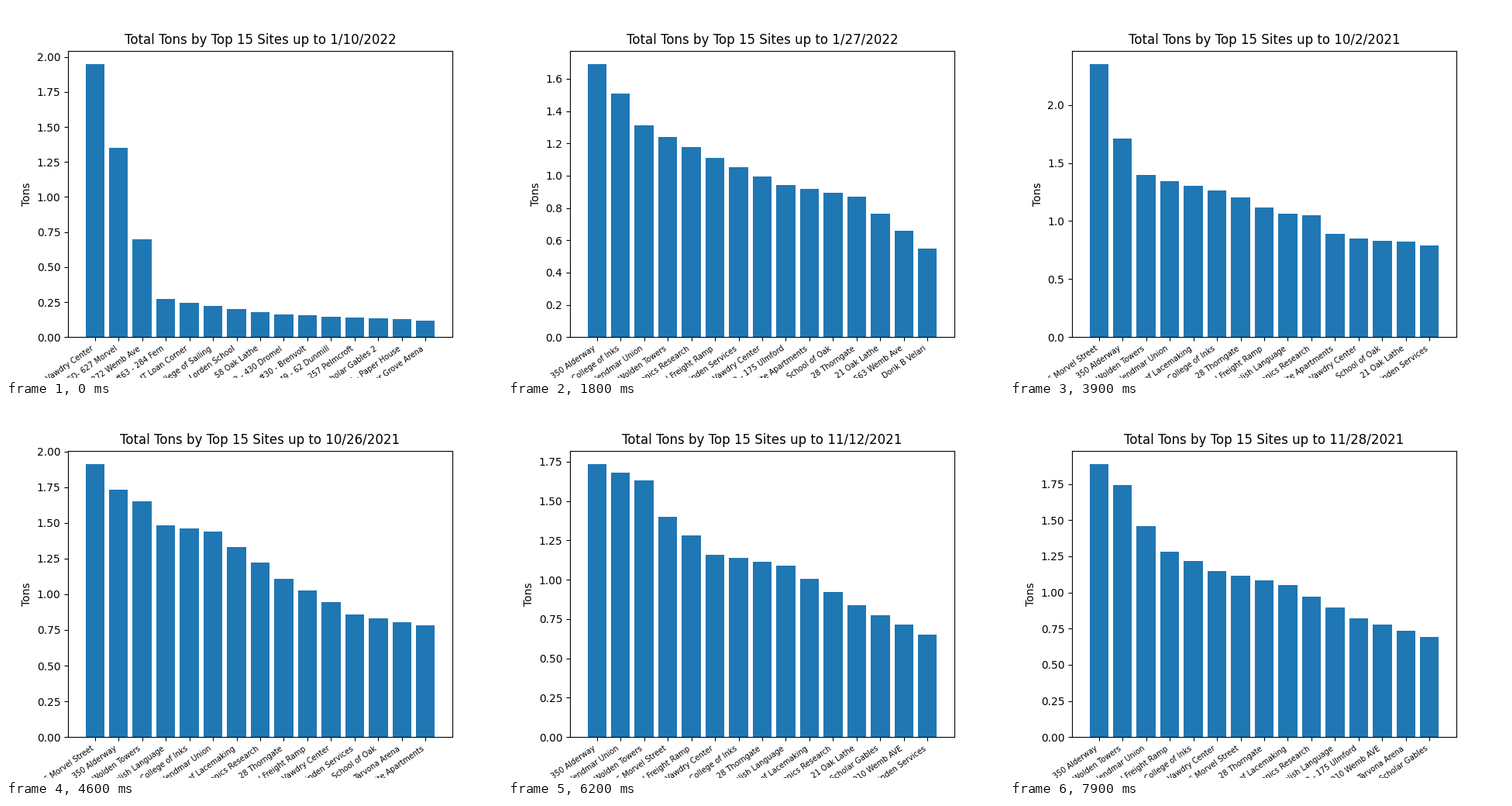
Write a matplotlib script that moves like this. It is 640x480 px and loops after 8000 ms.

```python
import matplotlib.pyplot as plt
import numpy as np
from matplotlib.animation import FuncAnimation

FRAMES = 80
TOP = 15

SITES = {
    "a": "Vawdry Center", "b": "MED- 627 Morvel", "c": "372 Wemb Ave",
    "d": "#63 - 284 Fern", "e": "IT Loan Corner", "f": "College of Sailing",
    "g": "Lorden School", "h": "#47 - 58 Oak Lathe", "i": "#12 - 430 Dromel",
    "j": "#30 - Brenvolt", "k": "#49 - 62 Dunmill", "l": "- 257 Pelmcroft",
    "m": "Scholar Gables 2", "n": "#56 - Paper House",
    "o": "Winter Grove Arena", "p": "College of Inks", "q": "Hendmar Union",
    "r": "Harmonics Research", "s": "#32 - 175 Ulmford",
    "t": "#39 - 21 Oak Lathe", "u": "350 Alderway", "v": "563 Wemb Ave",
    "w": "Central Freight Ramp", "x": "Wolden Towers", "y": "Dorik B Velari",
    "z": "Kite Sciences", "A": "28 Thorngate", "B": "Linden Services",
    "C": "Granite Apartments", "D": "MED- 46 Morvel Street",
    "E": "MED- 390 Morvel", "F": "Polish Language", "G": "Tarvona Arena",
    "H": "910 Wemb AVE", "I": "Scholar Gables", "J": "School of Oak",
    "K": "College of Lacemaking",
}

# Key rankings: frame -> (site order, tons at the knot ranks)
KNOTS = (0, 1, 2, 3, 5, 8, 11, 14)
RANKINGS = {
    0: ("abcdefghijklmno", (1.947, 1.35, .70, .27, .22, .16, .14, .12)),
    9: ("pqrJstuvawxyzAK", (2.287, 2.20, 1.94, 1.37, 1.14, 1.00, .65, .51)),
    18: ("upqxrwBasCJAtvy", (1.69, 1.51, 1.31, 1.24, 1.11, .94, .87, .55)),
    32: ("DuAKqwxpCtrJEaB", (2.79, 1.69, 1.29, 1.28, 1.21, 1.00, .82, .72)),
    46: ("DuxFpqKrAwaBJGC", (1.91, 1.73, 1.65, 1.48, 1.44, 1.11, .86, .78)),
    62: ("uqxDwapAFKrtIHB", (1.734, 1.68, 1.63, 1.40, 1.16, 1.09, .84, .65)),
    79: ("uxqwpaDAKrFsHGI", (1.886, 1.74, 1.46, 1.28, 1.15, 1.05, .82, .69)),
}

# The leader holds level for a while; a late starter jumps to the lead
EXTRA = {
    "u": {54: 1.734, 63: 1.734, 72: 1.886},
    "D": {20: .5, 21: 3.05, 54: 1.4},
}


def rank_tons(order, knots):
    return dict(zip(order, np.interp(range(TOP), KNOTS, knots)))


def make_track(key):
    """Key points of one site; unranked sites wait just below the list."""
    points = dict(EXTRA.get(key, {}))
    for frame, (order, knots) in RANKINGS.items():
        points[frame] = rank_tons(order, knots).get(key, .9 * knots[-1])
    return zip(*sorted(points.items()))


def make_dates():
    months = [(1, 29, 2022), (10, 31, 2021), (11, 30, 2021)]
    days = [f"{m}/{d}/{y}" for m, last, y in months
            for d in range(1, last + 1)]
    return sorted(days)[1:FRAMES + 1]  # plain text order


TRACKS = {key: tuple(make_track(key)) for key in SITES}
DATES = make_dates()


def tons_at(frame):
    if frame < 9:  # new sites rise quickly at first
        frame = 9 * (1 - (1 - frame / 9) ** 2)
    return {key: np.interp(frame, *track) for key, track in TRACKS.items()}


fig, ax = plt.subplots(figsize=(6.4, 4.8), dpi=100)


def draw(frame):
    tons = tons_at(frame)
    best = sorted(tons, key=tons.get, reverse=True)[:TOP]
    ax.clear()
    ax.bar(range(TOP), [tons[key] for key in best])
    ax.set_xticks(range(TOP), [SITES[key] for key in best],
                  rotation=35, ha="right", fontsize=7)
    ax.set_ylabel("Tons")
    ax.set_title(f"Total Tons by Top {TOP} Sites up to {DATES[frame]}")


anim = FuncAnimation(fig, draw, frames=FRAMES, interval=100, repeat=True,
                     repeat_delay=0)
plt.show()
```
